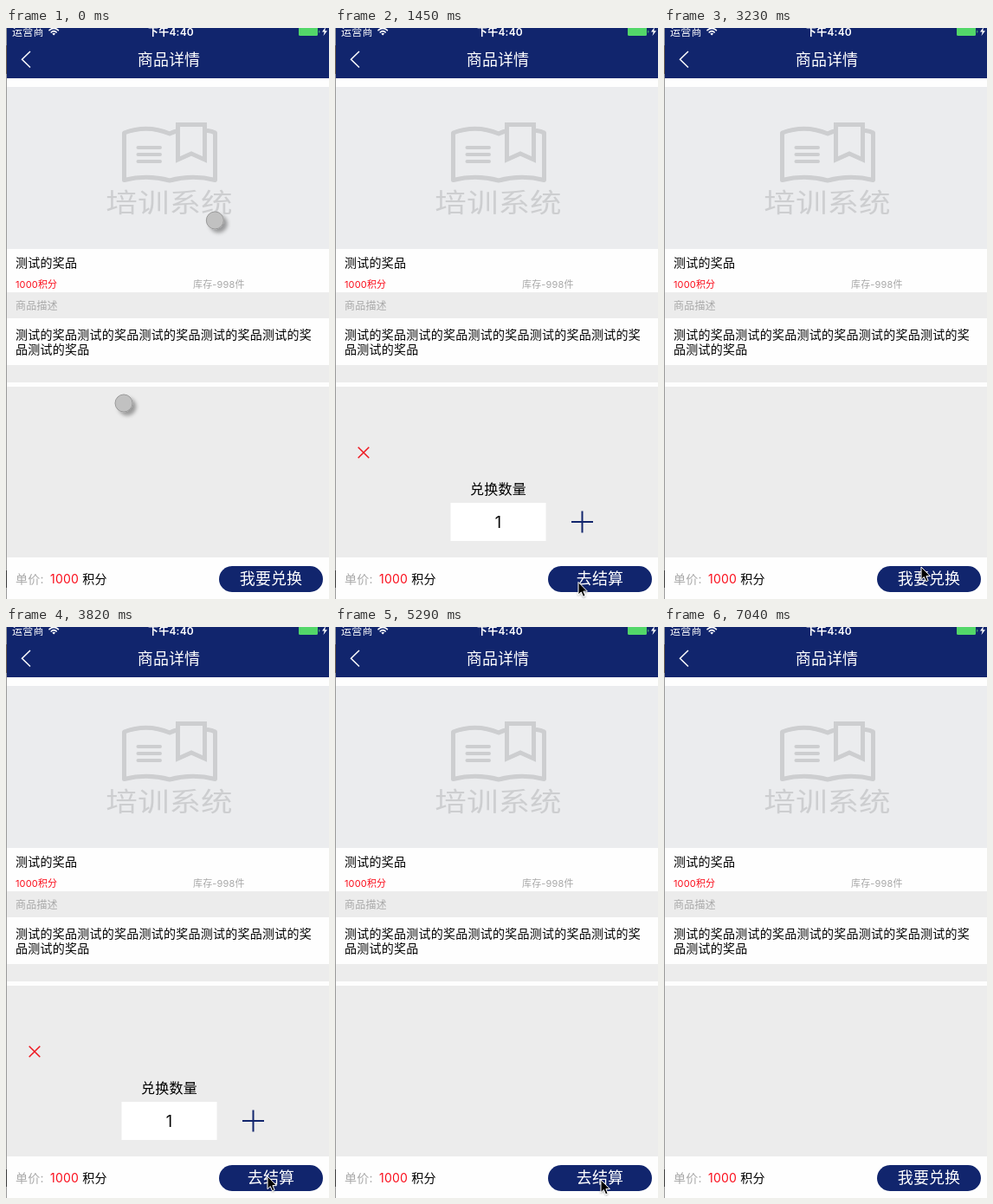
These frames come from a looping animation (373x659 px, 7060 ms). An HTML page:

```html
<!DOCTYPE html>
<html lang="zh-CN">
<head>
<meta charset="utf-8">
<title>商品详情</title>
<style>
  html, body { margin: 0; width: 100%; height: 100%; overflow: hidden; background: #fff; }
  svg { display: block; width: 373px; height: 659px; }
  text { font-family: Inter, "Noto Sans CJK SC", "Noto Sans CJK", sans-serif; fill: #000; }
  .navy { fill: #11256d; }
  .gray { fill: #ececec; }
  .s11 { font-size: 11px; letter-spacing: .15px; }
  .s12 { font-size: 12px; letter-spacing: .2px; }
  .s14 { font-size: 14px; letter-spacing: .25px; }
  .s16 { font-size: 16px; letter-spacing: .25px; }
  .s18 { font-size: 18px; letter-spacing: .1px; }
  .mid { text-anchor: middle; }
  text.white { fill: #fff; }
  text.red { fill: #fb0d1b; }
  text.pale { fill: #a9a9a9; }
  .line { fill: none; stroke-linecap: round; stroke-linejoin: round; }
</style>
</head>
<body>
<svg viewBox="0 0 373 659">
  <defs>
    <clipPath id="area"><rect y="414" width="373" height="197"/></clipPath>
    <filter id="soft" x="-50%" y="-50%" width="200%" height="200%">
      <feDropShadow dx="4" dy="4" stdDeviation="2" flood-opacity=".35"/>
    </filter>
    <filter id="faint" x="-50%" y="-50%" width="200%" height="200%">
      <feDropShadow dx="0" dy="1" stdDeviation="1" flood-opacity=".35"/>
    </filter>
  </defs>

  <rect width="373" height="659" fill="#fefefe"/>
  <rect class="navy" width="373" height="58"/>
  <rect y="68" width="373" height="187" fill="#ebecee"/>
  <rect class="gray" y="305" width="373" height="30"/>
  <rect class="gray" y="389" width="373" height="20"/>
  <rect class="gray" y="414" width="373" height="197"/>

  <!-- status bar -->
  <text class="s12 white" x="7" y="8.5">运营商</text>
  <g class="line" stroke="#fff" stroke-width="1.6">
    <path d="M50 2.6Q55.2-2 60.4 2.6M52.3 4.9Q55.2 2.4 58.1 4.9"/>
  </g>
  <path d="M53.3 6.4Q55.2 5 57.1 6.4L55.2 8.6Z" fill="#fff"/>
  <text class="s12 white mid" x="190.5" y="8.5" font-weight="600">下午4:40</text>
  <rect x="338" y="-1" width="22" height="10" rx="1.5" fill="#53d769"/>
  <path d="M361.3 2.5Q363.5 4 361.3 6Z" fill="#53d769"/>
  <path d="M369-1L365 4.5H367.7L366.5 9L371 3.2H368.3Z" fill="#fff"/>

  <!-- title bar -->
  <path d="M28 27L18.5 36.2L28 45.5" fill="none" stroke="#fff" stroke-width="1.5"/>
  <text class="s18 white mid" x="188" y="42.6">商品详情</text>

  <!-- picture placeholder -->
  <g class="line" stroke="#cdced0" stroke-width="5">
    <path d="M197 119Q193 120 189 122Q163 111 136.5 121V175.5Q163 169 189 176Q215 169 241.5 175.5V121Q238 119 233 118.5"/>
    <path d="M198.5 111.5H229.5V152L214 145L198.5 152Z" stroke-linejoin="miter"/>
    <path d="M152.5 138H178M152.5 146H178M152.5 154H178" stroke-width="4"/>
  </g>
  <text transform="translate(188.5 212) scale(1.22 1)" class="mid" font-size="30" style="fill:#cdced0">培训系统</text>

  <!-- product -->
  <text class="s14" x="11" y="275.5">测试的奖品</text>
  <text class="s11 red" x="11" y="299.5">1000积分</text>
  <text class="s11 pale" x="216" y="299.5">库存-998件</text>
  <text class="s12 pale" x="11" y="325">商品描述</text>
  <text class="s14" x="11" y="358.8">测试的奖品测试的奖品测试的奖品测试的奖品测试的奖</text>
  <text class="s14" x="11" y="376">品测试的奖品</text>

  <!-- quantity panel -->
  <g clip-path="url(#area)">
    <g id="panel">
      <path id="close" d="M26.7 476.7L39.3 489.3M39.3 476.7L26.7 489.3" fill="none" stroke-width="1.5"/>
      <text class="s16 mid" x="188.6" y="530.6">兑换数量</text>
      <rect x="133.5" y="541" width="110" height="44" fill="#fff"/>
      <text class="s18 mid" x="188.5" y="569.5">1</text>
      <path d="M273 563H298M285.5 550.5V575.5" stroke="#11256d" stroke-width="2"/>
    </g>
  </g>

  <!-- bottom bar -->
  <text class="s14 pale" x="11" y="641">单价:</text>
  <text class="s14 red" x="51" y="641">1000</text>
  <text class="s14" x="88.3" y="641">积分</text>
  <rect class="navy" x="246" y="621" width="120" height="30" rx="15"/>
  <text id="action" class="s18 white mid" x="306" y="642.2"></text>

  <!-- window edge -->
  <rect width="1" height="659" fill="#9a9a9a"/>
  <rect y="20" width="1" height="33" fill="#6d6050"/>
  <rect y="626" width="1" height="20" fill="#3c3c3c"/>

  <g id="touches" fill="#c1c1c1" stroke="#999" filter="url(#soft)">
    <circle cx="241.3" cy="222" r="10"/>
    <circle cx="136" cy="433" r="10"/>
  </g>
  <path id="cursor" d="M0 0V14.6L3.3 11.5L5.6 16.8L8.1 15.7L5.9 10.6H10.4Z" stroke="#fff" stroke-width="1" filter="url(#faint)"/>
</svg>
<script>
  const LOOP = 7060;
  const HIDDEN = 150;
  const $ = id => document.getElementById(id);

  // pointer tip: step, x, y
  const path = [
    [-1, 254, 672], [0, 258, 652], [1, 266, 646], [2, 274, 642], [3, 281, 639.5],
    [7, 281, 639.5], [8, 230, 610], [10, 60, 500], [11, 33, 482], [14, 33, 482],
    [17, 285, 605], [18, 297, 622], [19, 300, 631], [20, 302, 634], [22, 302, 634],
    [25, 60, 500], [26, 37, 486], [28, 37, 486], [31, 303, 636], [32, 307, 638],
    [34, 307, 638], [37, 45, 495], [38, 30, 480], [40, 28, 484], [41, 19, 560], [42, 19, 680]
  ];
  // steps at which the panel opens and closes
  const visits = [[4, 13], [20, 27], [32, 39]];
  const rise = [HIDDEN, 85, 7, 0];
  const fall = [7, 85, HIDDEN];

  // the screen refreshes in short even steps, with a pause before the first tap
  function stepAt(t) {
    if (t < 290) return -1;
    if (t < 1150) return Math.min(3, Math.floor((t - 290) / 146.6));
    return 4 + Math.floor((t - 1150) / 147.85);
  }

  function pointer(n) {
    const i = path.findIndex(p => p[0] >= n);
    if (i < 0) return path[path.length - 1].slice(1);
    if (i === 0) return path[0].slice(1);
    const a = path[i - 1], b = path[i];
    const k = (n - a[0]) / (b[0] - a[0]);
    return [1, 2].map(j => a[j] + (b[j] - a[j]) * k);
  }

  function panelState(n) {
    const visit = visits.filter(v => n >= v[0]).pop();
    if (!visit) return { open: false, y: HIDDEN };
    const [start, end] = visit;
    const open = n < end;
    const y = open ? rise[Math.min(n - start, 3)] : fall[Math.min(n - end, 2)];
    return { open, y, pressed: n === end - 1 };
  }

  function draw(t) {
    const n = stepAt(t);
    const { open, y, pressed } = panelState(n);
    $("panel").setAttribute("transform", `translate(0 ${y})`);
    $("close").setAttribute("stroke", pressed ? "#7c1114" : "#ee161f");
    $("action").textContent = open ? "去结算" : "我要兑换";
    $("touches").style.display = n < 4 ? "" : "none";
    $("cursor").setAttribute("transform", `translate(${pointer(n)})`);
  }

  function tick() {
    draw(performance.now() % LOOP);
    requestAnimationFrame(tick);
  }
  tick();
</script>
</body>
</html>
```
